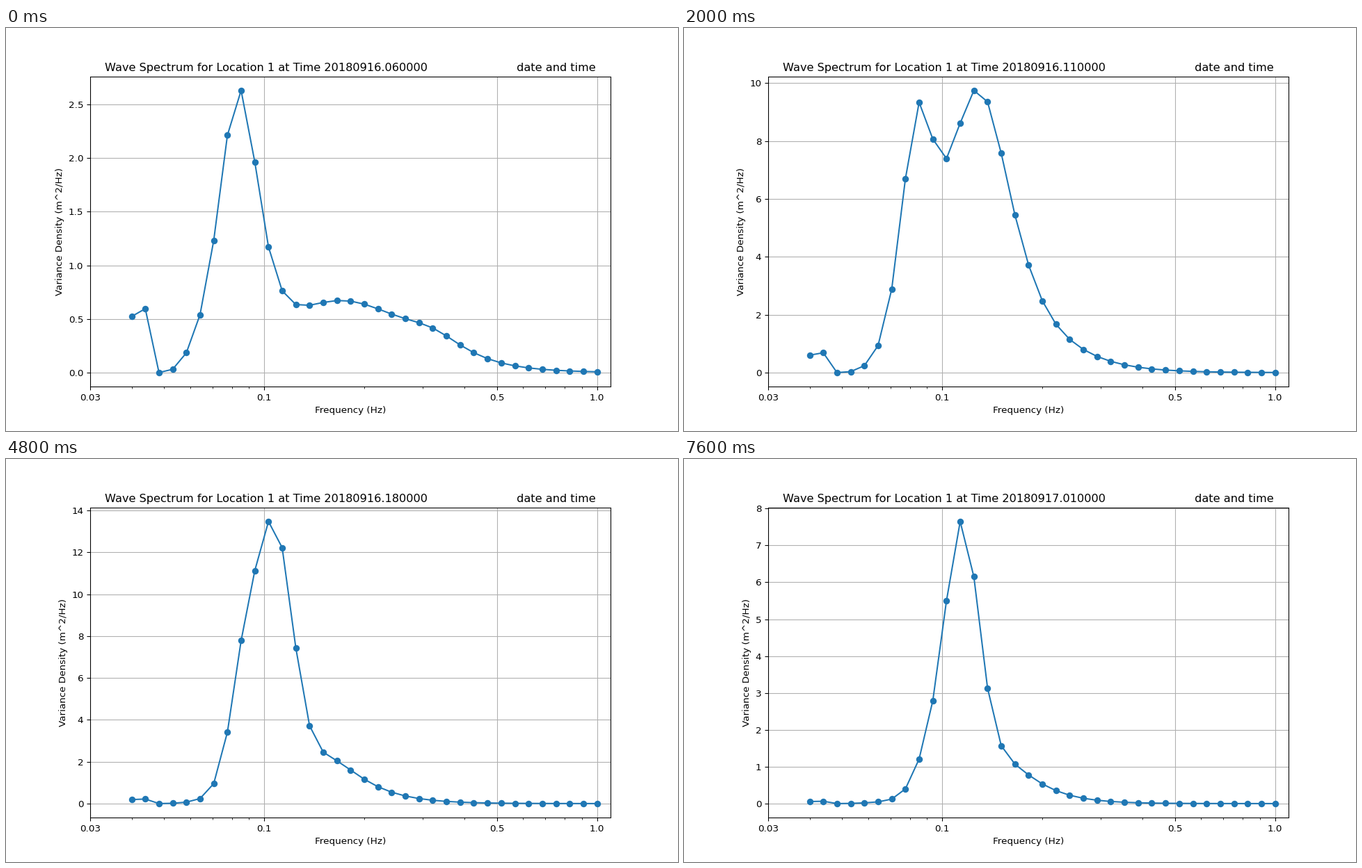
A matplotlib script that plays this animation: 966 by 580 pixels, repeating every 8 s.

```python
import matplotlib.pyplot as plt
import numpy as np
from matplotlib.animation import FuncAnimation
from matplotlib.ticker import NullFormatter

WIDTH, HEIGHT, DPI = 966, 580, 97
FRAMES, INTERVAL = 20, 400
START_HOUR, START_DAY = 6, 16
BINS = np.arange(35)
FREQ = np.geomspace(0.04, 1.0, len(BINS))

# Storm history at a few hours after the start
HOURS = [0, 3, 7, 9, 12, 15, 19]
SWELL = [2.4, 5.0, 9.2, 9.0, 5.0, 2.4, 1.0]
WIND_SEA = [0.6, 5.9, 9.5, 13.0, 12.0, 10.2, 7.1]
WIND_BIN = [15, 13.1, 11.3, 10.5, 10.4, 10.8, 11.1]
TAIL = [0.25, 1.4, 2.3, 2.2, 2.1, 1.85, 1.15]
PEAK_HOURS = [0, 3, 5, 7, 9, 12, 15, 17, 19]
PEAKS = [2.63, 6.64, 9.75, 11.08, 14.77, 13.48, 11.36, 9.75, 7.65]


def bump(x, center, decay, width=2):
    """Round top with exponential flanks."""
    return np.exp(-decay * (np.hypot(x - center, width) - width))


def gauss(x, center, sigma):
    return np.exp(-0.5 * ((x - center) / sigma) ** 2)


def density(hour):
    swell, wind, wind_bin, tail = (
        np.interp(hour, HOURS, keys) for keys in (SWELL, WIND_SEA, WIND_BIN, TAIL))
    waves = (swell * bump(BINS, 7.8 + 0.9 * (hour / 19) ** 2, min(2, 1.1 + 0.08 * hour))
             + wind * gauss(BINS, wind_bin, 1.2 + 3 * np.exp(-hour / 4))
             + tail * bump(BINS, 14 + 8 * np.exp(-hour / 3.5), 0.35 + 0.007 * hour))
    waves *= 1 - gauss(BINS, 2, 1.06)
    waves *= np.interp(hour, PEAK_HOURS, PEAKS) / waves.max()
    long_waves = 0.75 * bump(hour, 3, 0.18) * (0.93 + 0.13 * BINS)
    return np.where(BINS < 2, long_waves, waves)


fig, ax = plt.subplots(figsize=(WIDTH / DPI, HEIGHT / DPI), dpi=DPI)
line, = ax.plot(FREQ, density(0), "o-")
ax.set_xscale("log")
ax.set_xlim(0.03, 1.1)
ax.set_xticks([0.03, 0.1, 0.5, 1.0], ["0.03", "0.1", "0.5", "1.0"])
ax.xaxis.set_minor_formatter(NullFormatter())
ax.set_xlabel("Frequency (Hz)")
ax.set_ylabel("Variance Density (m^2/Hz)")
ax.grid(True)


def update(frame):
    days, hour = divmod(START_HOUR + frame, 24)
    stamp = f"201809{START_DAY + days:02d}.{hour:02d}0000"
    line.set_ydata(density(frame))
    ax.relim()
    ax.autoscale_view(scalex=False)
    ax.set_title(f"Wave Spectrum for Location 1 at Time {stamp}"
                 + " " * 25 + "date and time")
    return line,


anim = FuncAnimation(fig, update, frames=FRAMES, interval=INTERVAL,
                     init_func=lambda: update(0), repeat=True, repeat_delay=0)
plt.show()
```
